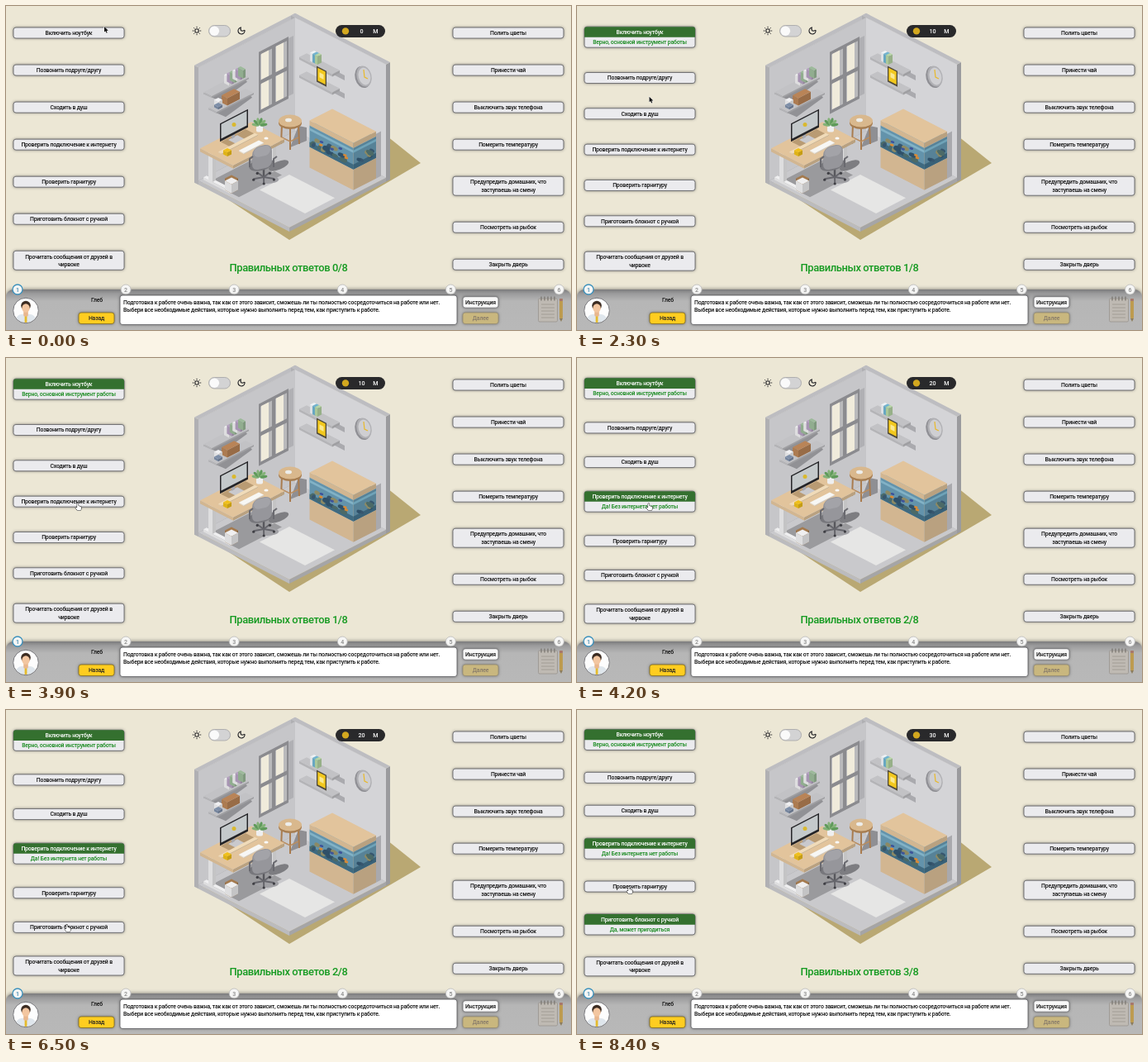
Write an HTML page with a canvas that moves like this. It is 684 px wide and 392 px high and loops after 8.7 s.

```html
<!DOCTYPE html>
<html lang="ru">
<head>
<meta charset="utf-8">
<style>
html, body { margin: 0; width: 100%; height: 100%; overflow: hidden; background: #ece7d5; }
canvas { display: block; width: 684px; height: 392px; }
</style>
</head>
<body>
<canvas id="stage"></canvas>
<script>
const W = 684, H = 392, LOOP = 8700, STEP = 100, PAPER = '#ece7d5';
const WOOD = '#e2c49c', GREY = '#c2c2c5', WHITE = '#efeff0', DARK = '#8b8b8f', INK = '#242427';
const canvas = document.getElementById('stage');
const dpr = window.devicePixelRatio || 1;
canvas.width = W * dpr;
canvas.height = H * dpr;
const ctx = canvas.getContext('2d');

const LEFT = [
  { text: ['Включить ноутбук'], hint: 'Верно, основной инструмент работы', at: 800 },
  { text: ['Позвонить подруге/другу'] },
  { text: ['Сходить в душ'] },
  { text: ['Проверить подключение к интернету'], hint: 'Да! Без интернета нет работы', at: 4100 },
  { text: ['Проверить гарнитуру'] },
  { text: ['Приготовить блокнот с ручкой'], hint: 'Да, может пригодиться', at: 6900 },
  { text: ['Прочитать сообщения от друзей в', 'чирвоке'] }
];
const RIGHT = [
  { text: ['Полить цветы'] },
  { text: ['Принести чай'] },
  { text: ['Выключить звук телефона'] },
  { text: ['Померить температуру'] },
  { text: ['Предупредить домашних, что', 'заступаешь на смену'] },
  { text: ['Посмотреть на рыбок'] },
  { text: ['Закрыть дверь'] }
];
const CLICKS = LEFT.filter(b => b.at).map(b => b.at);

// Pointer moves: start, end, and where the tip comes to rest
const HOME = { x: 119, y: 25 };
const MOVES = [
  { from: 0, to: 300, x: 112, y: 31 },
  { from: 1600, to: 2500, x: 84, y: 121 },
  { from: 2500, to: 2700, x: 86, y: 127 },
  { from: 2900, to: 3900, x: 87, y: 176 },
  { from: 5000, to: 5600, x: 426, y: 39 },
  { from: 5600, to: 5900, x: 210, y: 190 },
  { from: 5900, to: 6600, x: 66, y: 264 },
  { from: 7700, to: 8400, x: 63, y: 214 }
];
const ARROW = new Path2D('M0 0V6.6L1.5 5.3L2.6 7.8L3.7 7.3L2.7 4.9L4.8 4.8Z');
const HAND = new Path2D('M-.8 0H.5L.7 3L4.3 4L4.2 6.5L3.2 8.5H-.6L-2.8 5.3L-2.2 4.5L-.9 5.2Z');

function random(seed) {
  return () => {
    const v = Math.sin(seed++ * 12.9898) * 43758.5453;
    return v - Math.floor(v);
  };
}

const shade = (hex, k) => `rgb(${[1, 3, 5].map(i => Math.round(parseInt(hex.slice(i, i + 2), 16) * k))})`;

// Room axes: a runs along the left wall, b along the right wall, z goes up
const iso = (a, b, z) => [350 - a + b, 151 + 0.515 * (a + b) - z];

function trace(points) {
  ctx.beginPath();
  points.forEach(p => ctx.lineTo(...p));
}

function poly(color, ...points) {
  trace(points);
  ctx.closePath();
  ctx.fillStyle = color;
  ctx.fill();
}

function line(color, width, ...points) {
  trace(points);
  ctx.strokeStyle = color;
  ctx.lineWidth = width;
  ctx.stroke();
}

function floorQuad(color, a, b, da, db, z = 0) {
  poly(color, iso(a, b, z), iso(a + da, b, z), iso(a + da, b + db, z), iso(a, b + db, z));
}

function leftQuad(color, a, z, da, dz, b = 0) {
  poly(color, iso(a, b, z), iso(a + da, b, z), iso(a + da, b, z + dz), iso(a, b, z + dz));
}

function rightQuad(color, b, z, db, dz, a = 0) {
  poly(color, iso(a, b, z), iso(a, b + db, z), iso(a, b + db, z + dz), iso(a, b, z + dz));
}

function block(color, a, b, z, da, db, dz) {
  rightQuad(shade(color, 0.93), b, z, db, dz, a + da);
  leftQuad(shade(color, 0.82), a, z, da, dz, b + db);
  floorQuad(color, a, b, da, db, z + dz);
}

function oval(color, x, y, rx, ry = rx, turn = 0) {
  ctx.beginPath();
  ctx.ellipse(x, y, rx, ry, turn, 0, Math.PI * 2);
  ctx.fillStyle = color;
  ctx.fill();
}

function ring(color, width, x, y, r) {
  ctx.beginPath();
  ctx.arc(x, y, r, 0, Math.PI * 2);
  ctx.strokeStyle = color;
  ctx.lineWidth = width;
  ctx.stroke();
}

function box(x, y, w, h, r, fill, stroke, width = 0.9) {
  ctx.beginPath();
  ctx.roundRect(x, y, w, h, r);
  if (fill) { ctx.fillStyle = fill; ctx.fill(); }
  if (stroke) { ctx.strokeStyle = stroke; ctx.lineWidth = width; ctx.stroke(); }
}

function raised(x, y, w, h, fill, stroke = '#69696c') {
  ctx.save();
  ctx.shadowColor = 'rgba(60,60,60,.8)';
  ctx.shadowBlur = 3.5 * dpr;
  box(x, y, w, h, 3, fill);
  ctx.restore();
  box(x, y, w, h, 3, null, stroke);
}

function label(text, x, y, { color = '#111', size = 6.9, align = 'center', track = -0.2 } = {}) {
  ctx.font = `500 ${size}px Roboto, sans-serif`;
  ctx.letterSpacing = track + 'px';
  ctx.textAlign = align;
  ctx.textBaseline = 'alphabetic';
  ctx.fillStyle = color;
  ctx.fillText(text, x, y + size * 0.355);
}

// Spreads a column evenly, half a gap at both ends
function layout(items, t) {
  const rows = items.map(b => {
    const open = b.at !== undefined && t >= b.at;
    return { ...b, open, h: open ? 25 : b.text.length > 1 ? 23 : 13 };
  });
  const gap = (325.3 - rows.reduce((sum, r) => sum + r.h, 0)) / rows.length;
  let y = 10 + gap / 2;
  for (const r of rows) { r.y = y; y += r.h + gap; }
  return rows;
}

function column(rows, x) {
  const w = 134, cx = x + w / 2;
  for (const r of rows) {
    raised(x, r.y, w, r.h, '#ebebee');
    if (r.open) {
      box(x, r.y, w, 12.7, [3, 3, 0, 0], '#34702f');
      label(r.text[0], cx, r.y + 6.5, { color: '#fff' });
      label(r.hint, cx, r.y + 18.4, { color: '#15891c' });
    } else {
      const mid = r.y + r.h / 2;
      r.text.forEach((s, i) => label(s, cx, mid + (i - (r.text.length - 1) / 2) * 9.4));
    }
  }
}

function room() {
  const base = -5, top = 142;
  poly('#b9a873', [229, 208], [343, 283], [502, 190], [462, 158]);
  block('#bdbdc1', -5, -5, base, 122, 5, top);
  block('#bdbdc1', -5, -5, base, 5, 115, top);
  leftQuad('#c6c6c9', 0, 0, 117, 137);
  rightQuad('#d4d4d7', 0, 0, 110, 137);
  block('#c9c9cc', 0, 0, base, 117, 110, 5);
  floorQuad('#e6e6e5', 55, 48, 36, 55);
}

function windowFrame() {
  leftQuad('#b0b0b4', 2, 46, 6, 70);
  leftQuad(DARK, 8, 43, 36, 75);
  for (const a of [10, 28]) {
    for (const z of [47, 83]) {
      leftQuad('#b9b9bb', a, z, 14, 31);
      leftQuad('#f0ebdb', a + 4, z, 9, 31);
    }
  }
}

function books(place, count, colors) {
  for (let i = 0; i < count; i++) place(i, colors[i % colors.length]);
}

function shelf(a, z) {
  poly('#919195', iso(a + 45, 0, z), iso(a, 0, z), iso(a - 8, 0, z - 13), iso(a + 24, 0, z - 20));
  block(GREY, a, 0, z, 45, 10, 2);
}

function shelves() {
  shelf(66, 102);
  books((i, c) => block(c, 85 - i * 3.4, 2, 104, 3, 6, 10), 6, [WHITE, '#b4a0c0', '#9cba9a']);
  shelf(60, 80);
  block('#b98457', 76, 2, 82, 15, 7, 9);
  block('#f1f1f3', 96, 3, 82, 5, 5, 9);
  block('#7d8ea8', 96, 3, 82, 5, 5, 3);

  for (const z of [98, 76]) {
    rightQuad('#aaaaae', 18, z - 6, 42, 6);
    block(GREY, 0, 14, z, 9, 40, 3);
  }
  books((i, c) => block(c, 2, 25 + i * 3, 101, 5, 3, 10), 3, ['#eef2f5', '#70b4cf', '#b8d7a6']);
  rightQuad('#4f493a', 32, 79, 12, 19, 6);
  rightQuad('#f2c81d', 33.3, 81, 9.4, 15.5, 6);
  rightQuad('#fbe991', 35.5, 86, 5, 6, 6);
}

function clock() {
  const x = 433, y = 85, tilt = -0.25;
  oval('#8f8f94', x - 1, y + 1, 9.5, 13.3, tilt);
  oval('#b0b0b4', x + 0.5, y, 9, 12.8, tilt);
  oval('#cfcfd2', x + 1, y, 7.2, 10.6, tilt);
  line('#e9b92a', 1.2, [x, y - 8], [x + 1, y + 1], [x + 5, y + 3]);
}

function sideTable() {
  const x = 344, y = 139;
  poly('#8f8f93', [x + 10, y + 6], [x + 20, y + 8], [x + 20, y + 24], [x, y + 32]);
  for (const dx of [-10, 0, 10]) line('#a97c4f', 2, [x + dx, y + 4], [x + dx * 1.1, y + 35 - Math.abs(dx) * 0.7]);
  line('#b98d60', 1.4, [x - 10, y + 20], [x, y + 25], [x + 10, y + 20]);
  oval('#a77e52', x, y + 2.5, 14, 7.5);
  oval('#d9b88d', x, y, 14, 7.5);
  oval('#ededeb', x - 2, y - 1, 4, 2.3);
}

function plant(x, y) {
  box(x - 4, y, 8, 8, 2, WHITE);
  for (let i = 0; i < 6; i++) {
    const turn = Math.PI * (1.05 + i * 0.18);
    oval(i % 2 ? '#5f9a5a' : '#83b277', x + Math.cos(turn) * 5, y + Math.sin(turn) * 5, 4.5, 1.7, turn);
  }
}

function desk() {
  const top = 39;
  floorQuad('#9a9a9d', 60, 8, 52, 36);
  block(WHITE, 109, 2, 0, 4, 32, 3);
  block(WHITE, 109, 8, 3, 4, 5, top - 6);
  block(WHITE, 58, 30, 0, 4, 5, top - 3);
  block('#a47a4e', 104, 27, 0, 8, 8, 14);
  block(WHITE, 104, 27, 0, 8, 8, 11);
  block(WOOD, 54, 1, top - 4, 62, 40, 4);

  floorQuad('#b99b73', 66, 6, 30, 12, top);
  floorQuad('#c9c9cd', 78, 8, 11, 9, top);
  leftQuad('#a9a9ae', 82, top, 4, 9, 9);
  leftQuad(INK, 67, top + 5, 34, 22, 10);
  leftQuad('#c4c9cb', 68.5, top + 8, 31, 17.5, 10);
  oval('#d9b92e', ...iso(84, 10, top + 17), 2.5);
  block('#f0dbb9', 66, 17, top, 44, 4, 1);
  block('#f7f7f5', 72, 28, top, 24, 6, 1);
  oval('#fafafa', ...iso(64, 29, top), 2.6, 1.5);
  block('#f0c01a', 104, 22, top, 5, 5, 5);
  plant(...iso(56, 13, top + 3));
}

function chair() {
  const x = 312, y = 207;
  oval('#7d7d81', x + 18, y - 14, 13, 5, -0.4);
  oval('#a0a0a4', x + 4, y + 3, 14, 5);
  line('#58585d', 2.4, [x, y - 10], [x, y]);
  for (let i = 0; i < 5; i++) {
    const turn = 0.3 + i * Math.PI * 0.4;
    const foot = [x + Math.cos(turn) * 13, y + Math.sin(turn) * 7];
    line('#65656b', 2, [x, y], foot);
    oval('#3e3e43', foot[0], foot[1] + 1, 1.6);
  }
  oval('#77777c', x - 3, y - 15, 15, 7, -0.25);
  ctx.save();
  ctx.translate(x - 3, y - 25);
  ctx.transform(1, -0.22, 0, 1, 0, 0);
  box(-11, -13, 24, 28, [9, 9, 7, 7], '#96969b');
  box(-9, -12, 20, 12, 8, '#a3a3a8');
  ctx.restore();
  for (const dx of [-17, 12]) line('#69696f', 2, [x + dx, y - 12], [x + dx, y - 22], [x + dx + 4, y - 25]);
}

function aquarium() {
  const a = 7, b = 52, da = 27.5, db = 53, base = 25, water = 26;
  leftQuad('#a9a9ad', a - 6, 0, 6, 54, b + db);
  block(WOOD, a, b, 0, da, db, base);
  block('#6a9eb8', a, b, base, da, db, water);
  rightQuad('#82b2c6', b, base + water - 6, db, 3, a + da);
  leftQuad('#6fa3b8', a, base + water - 6, da, 3, b + db);
  rightQuad('#3f6a80', b, base, db, 6, a + da);
  leftQuad('#396177', a, base, da, 6, b + db);
  const rnd = random(7);
  for (let i = 0; i < 22; i++) {
    const u = rnd(), z = base + 4 + rnd() * 10;
    const [x, y] = i % 3 ? iso(a + da, b + 4 + u * (db - 8), z) : iso(a + 4 + u * (da - 8), b + db, z);
    oval(['#2f5068', '#4b6a68', '#37566e', '#8c8a64'][i % 4], x, y, 2 + rnd() * 3, 1.5 + rnd() * 2, 0.5);
  }
  for (let i = 0; i < 6; i++) {
    const [x, y] = iso(a + da, b + 8 + rnd() * (db - 14), base + 9 + rnd() * 9);
    oval(i % 2 ? '#d98a35' : '#3d549a', x, y, 2.4, 1.4, 0.3);
  }
  block(WOOD, a, b, base + water, da, db, 6);
}

function topBar(t) {
  const score = CLICKS.filter(c => t >= c).length;
  ring(INK, 1.1, 231, 30, 2.2);
  for (let i = 0; i < 8; i++) {
    const c = Math.cos(i * Math.PI / 4), s = Math.sin(i * Math.PI / 4);
    line(INK, 1, [231 + c * 3.7, 30 + s * 3.7], [231 + c * 5.2, 30 + s * 5.2]);
  }
  box(245.5, 23.5, 26, 13.5, 6.75, '#d3d3d4', '#a2a2a5', 0.8);
  oval('#fafafa', 252.3, 30.2, 5.8);
  ctx.beginPath();
  ctx.arc(285, 30, 4, -0.2, Math.PI * 1.5 - 0.2);
  ctx.quadraticCurveTo(283, 32, 288.9, 29.2);
  ctx.strokeStyle = INK;
  ctx.lineWidth = 1.2;
  ctx.stroke();

  box(399, 23, 60, 15, 7.5, '#29292b');
  const flash = CLICKS.some(c => t >= c && t < c + STEP);
  if (flash) oval('#5d8739', 411, 30.4, 6.8);
  oval(flash ? '#efc51f' : '#d3a81f', 411, 30.4, flash ? 5.2 : 4.2);
  const white = { color: '#fff', size: 7.2, track: 0 };
  label(String(score * 10), 430.5, 30.5, white);
  label('М', 447.5, 30.5, white);
  label(`Правильных ответов ${score}/8`, 342, 316.5, { color: '#149a20', size: 12.9, track: -0.4 });
}

function avatar() {
  const x = 24, y = 368.5;
  oval('#fdfdfd', x, y, 15.3);
  ctx.save();
  ctx.beginPath();
  ctx.arc(x, y, 14.6, 0, Math.PI * 2);
  ctx.clip();
  box(x - 12, y + 4.5, 24, 16, 7, '#dfe6ec');
  box(x - 2.8, y, 5.6, 7.5, 2.5, '#e9b78e');
  box(x - 1.4, y + 7, 2.8, 9, 1, '#e5bb2b');
  oval('#3c2c22', x, y - 6, 5.8, 5.8);
  oval('#f3c6a0', x, y - 3, 4.7, 5.2);
  ctx.restore();
  ring('#77777b', 1, x, y, 15.3);
}

function notebook() {
  box(644.5, 354, 23, 28, 1.5, '#bfbab3', '#98948e', 0.8);
  for (let i = 0; i < 5; i++) {
    line('#77736d', 1.2, [648 + i * 4, 351.5], [648 + i * 4, 356.5]);
    line('#9a968f', 0.8, [648, 361 + i * 4], [664, 361 + i * 4]);
  }
  box(670, 354, 4, 24, 1, '#bd9b50');
  box(670, 354, 4, 3, 1, '#a7776d');
  poly('#8b7b5b', [670, 378], [674, 378], [672, 382]);
}

function button(text, x, y, fill, stroke, color) {
  raised(x, y, 43, 13.5, fill, stroke);
  label(text, x + 21.5, y + 6.9, { color });
}

function bottomPanel() {
  const fade = ctx.createLinearGradient(0, 342, 0, 392);
  fade.addColorStop(0, '#747476');
  fade.addColorStop(0.12, '#9b9b9c');
  fade.addColorStop(0.3, '#b6b6b6');
  fade.addColorStop(1, '#b8b8b8');
  ctx.save();
  ctx.shadowColor = 'rgba(60,60,60,.7)';
  ctx.shadowBlur = 5 * dpr;
  box(0, 343, W, 60, 9, fade);
  ctx.restore();
  for (let i = 0; i < 6; i++) {
    const x = 14 + i * 131.1;
    oval('#f6f6f5', x, 343, 6);
    ring(i ? '#b9b9b9' : '#3c91bc', i ? 0.8 : 1.3, x, 343, 6);
    label(String(i + 1), x, 343.2, { size: 7, color: i ? '#8a8a8a' : '#3382ad', track: 0 });
  }
  avatar();
  label('Глеб', 110, 356);
  raised(138, 350, 408, 35.5, '#fff');
  const left = { align: 'left' };
  label('Подготовка к работе очень важна, так как от этого зависит, сможешь ли ты полностью сосредоточиться на работе или нет.', 142, 358.5, left);
  label('Выбери все необходимые действия, которые нужно выполнить перед тем, как приступить к работе.', 142, 367.7, left);
  button('Назад', 88, 371, '#ffcd20', '#8a7327', '#222');
  button('Инструкция', 553, 351.7, '#f8f8f8', '#77777a', '#111');
  button('Далее', 553, 371, '#c9b77e', '#9b9175', '#85796a');
  notebook();
}

function pointerAt(t) {
  let { x, y } = HOME;
  for (const m of MOVES) {
    const k = Math.min(1, Math.max(0, (t - m.from) / (m.to - m.from)));
    const e = k * k * (3 - 2 * k);
    x += (m.x - x) * e;
    y += (m.y - y) * e;
  }
  return [x, y];
}

function pointer(t, rows) {
  const [x, y] = pointerAt(t);
  const over = x >= 9 && x <= 143 && rows.some(r => y >= r.y && y <= r.y + r.h);
  const shape = over ? HAND : ARROW;
  ctx.save();
  ctx.translate(x, y);
  ctx.lineJoin = 'round';
  ctx.lineWidth = 1;
  ctx.strokeStyle = over ? '#111' : '#fff';
  ctx.fillStyle = over ? '#fff' : '#111';
  ctx.stroke(shape);
  ctx.fill(shape);
  ctx.restore();
}

function draw(t) {
  ctx.setTransform(dpr, 0, 0, dpr, 0, 0);
  ctx.fillStyle = PAPER;
  ctx.fillRect(0, 0, W, H);
  room();
  windowFrame();
  shelves();
  clock();
  sideTable();
  desk();
  chair();
  aquarium();
  topBar(t);
  const rows = layout(LEFT, t);
  column(rows, 9);
  column(layout(RIGHT, t), 541);
  bottomPanel();
  pointer(t, rows);
}

const start = performance.now();
let shown = -1;
function tick() {
  const t = Math.floor(((performance.now() - start) % LOOP) / STEP) * STEP;
  if (t !== shown) draw(shown = t);
  requestAnimationFrame(tick);
}
tick();
</script>
</body>
</html>
```
